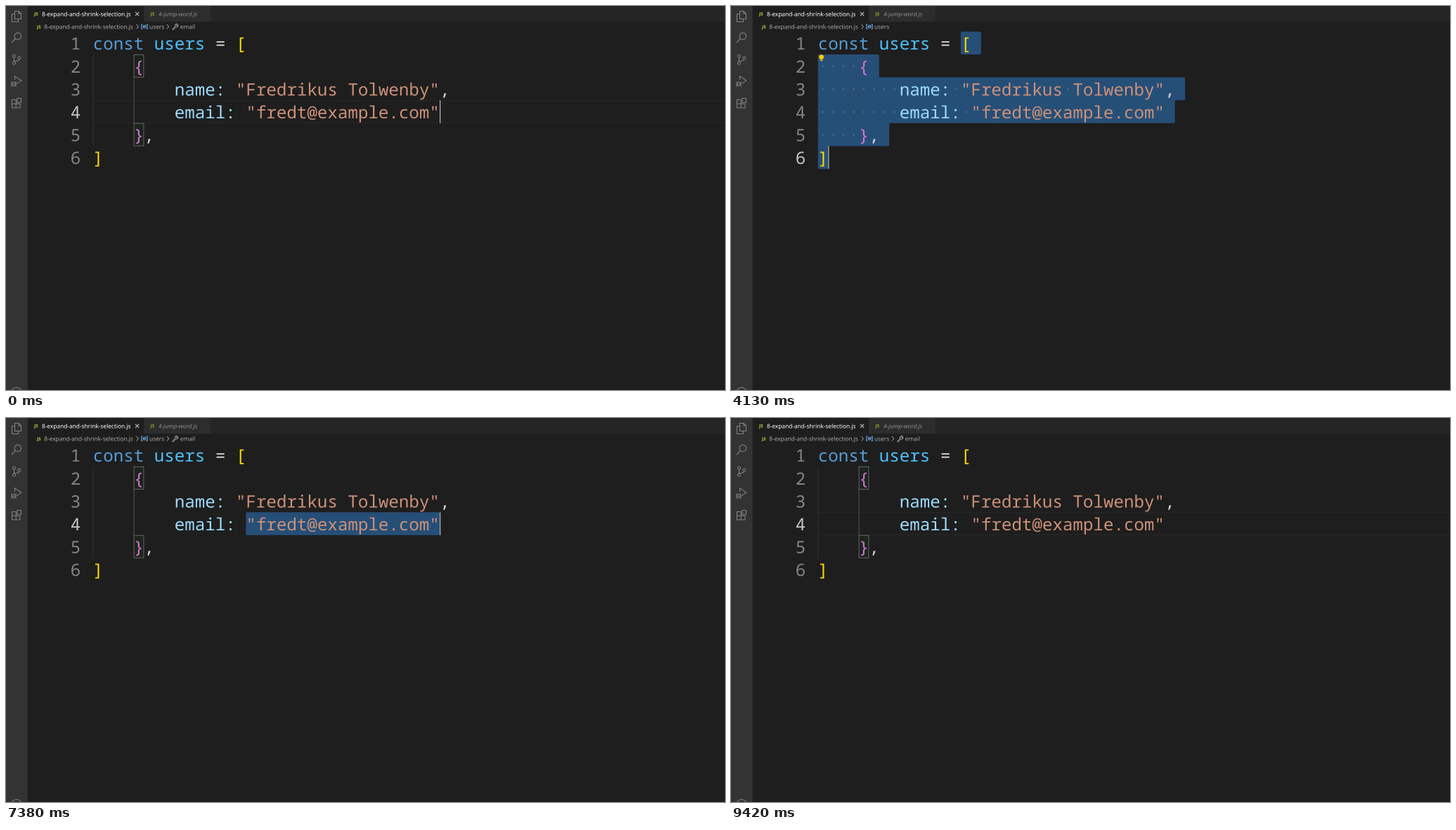
These frames come from a looping animation (1023 by 547 pixels, 9790 ms). An HTML page with a canvas:

```html
<!DOCTYPE html>
<html lang="en">
<head>
<meta charset="utf-8">
<title>Expand and shrink selection</title>
<style>
  html, body { margin: 0; width: 100%; height: 100%; overflow: hidden; background: #1e1e1e; }
  canvas { display: block; width: 100%; height: 100%; }
</style>
</head>
<body>
<canvas id="stage"></canvas>
<script>
const W = 1023, H = 547, LOOP = 9790;
const SHARP = 2;      // drawn at double size so text can sit between pixels
const UNIT = .6394;   // one interface pixel on the stage
const canvas = document.getElementById('stage');
canvas.width = W * SHARP;
canvas.height = H * SHARP;
const ctx = canvas.getContext('2d');

const CODE_FONT = '24.18px "Noto Sans Mono", "DejaVu Sans Mono", monospace';
const UI_FONT = '8.31px "Noto Sans", "Open Sans", sans-serif';
const BADGE_FONT = 'bold 6.3px "Noto Sans", sans-serif';
const BAR = 48 * UNIT, TABS = 35 * UNIT;
const LEFT = 123.7, PITCH = 14.51, TOP = 57 * UNIT, LINE = 51 * UNIT;

const BLUE = '#569cd6', CYAN = '#4fc1ff', PROP = '#9cdcfe', STR = '#ce9178';
const PLAIN = '#d4d4d4', GOLD = '#ffd700', PINK = '#da70d6', ICON = '#858585';

// Each line is a list of [column, text, colour].
const code = [
  [[0, 'const', BLUE], [6, 'users', CYAN], [12, '=', PLAIN], [14, '[', GOLD]],
  [[4, '{', PINK]],
  [[8, 'name:', PROP], [14, '"Fredrikus Tolwenby"', STR], [34, ',', PLAIN]],
  [[8, 'email:', PROP], [15, '"fredt@example.com"', STR]],
  [[4, '}', PINK], [5, ',', PLAIN]],
  [[0, ']', GOLD]]
];
const rows = code.map(parts =>
  parts.reduce((line, [col, text]) => line.padEnd(col) + text, ''));

// Selection levels: start line, start column, end line, end column.
const levels = [
  [3, 34, 3, 34], [3, 15, 3, 34], [3, 8, 3, 34], [3, 0, 3, 34],
  [1, 5, 4, 4], [1, 4, 4, 5], [1, 4, 4, 6], [1, 0, 4, 6],
  [0, 15, 5, 0], [0, 14, 5, 1], [0, 0, 5, 1]
];
const grow = [420, 920, 1330, 1670, 2080, 2420, 2750, 3080, 3380, 3670];
const shrink = [4130, 4460, 4750, 5080, 5460, 5710, 6000, 6330, 6630, 6920];

const xAt = col => LEFT + col * PITCH;
const yAt = line => TOP + line * LINE;
const within = (t, spans) => spans.some(([a, b]) => t >= a && t < b);

function levelAt(t) {
  if (t >= 8040) return Math.max(0, 9 - Math.floor((t - 8040) / 97.7));
  if (t >= 7380) return Math.min(10, 1 + Math.floor((t - 7380) / 45.5));
  const passed = list => list.filter(k => t >= k).length;
  return passed(grow) - passed(shrink);
}

function rect(x, y, w, h, color) {
  ctx.fillStyle = color;
  ctx.fillRect(x, y, w, h);
}

function label(text, x, y, color, font = UI_FONT) {
  ctx.font = font;
  ctx.fillStyle = color;
  ctx.fillText(text, x, y);
}

function stroke(d, color, width = 1) {
  ctx.strokeStyle = color;
  ctx.lineWidth = width;
  ctx.stroke(new Path2D(d));
}

function dot(x, y, r, color) {
  ctx.fillStyle = color;
  ctx.beginPath();
  ctx.arc(x, y, r, 0, Math.PI * 2);
  ctx.fill();
}

function ring(x, y, r, color = ICON, width = 1) {
  ctx.strokeStyle = color;
  ctx.lineWidth = width;
  ctx.beginPath();
  ctx.arc(x, y, r, 0, Math.PI * 2);
  ctx.stroke();
}

function drawActivityBar() {
  rect(0, 0, BAR, H, '#333333');
  // files
  stroke('M12.5 7.5H18L21.5 11V18.5H12.5ZM18 7.5V11H21.5', ICON);
  stroke('M12.5 11.5H8.5V22.5H17.5V18.5', ICON);
  // search
  ring(16.8, 43, 4.8);
  stroke('M13.3 46.5L8 52.2', ICON, 1.2);
  // source control
  ring(11.5, 71.3, 2);
  ring(18.8, 74.2, 2);
  ring(11.5, 81.2, 2);
  stroke('M11.5 73.3V79.2M18.8 76.2C18.5 79 14 77.5 11.8 79', ICON);
  // run and debug
  stroke('M12.5 105V99.8L21.8 106.3L15 111', ICON);
  ring(11, 111, 2.8);
  stroke('M7 108L8.8 109.4M15 108L13.2 109.4M6.8 111.2H15.2M7 115L8.8 113M15 115L13.2 113', ICON, .8);
  // extensions
  stroke('M8.5 133.5H14.2V145H8.5ZM8.5 139.2H20V145H14.2', ICON);
  stroke('M15.8 131.5H21.5V137.2H15.8Z', ICON);
  // account
  ring(15, 551, 7.5);
}

function drawHeader(emailCrumb) {
  const crumb = '#a9a9a9';
  const file = '8-expand-and-shrink-selection.js';
  const tabBase = 14.4, crumbBase = 32.65;
  rect(BAR, 0, W - BAR, TABS, '#252526');
  rect(BAR, 0, 196 - BAR, TABS, '#1e1e1e');
  rect(196.3, 0, 94, TABS, '#2d2d2d');
  label('JS', 40, 13.6, '#cbcb41', BADGE_FONT);
  label(file, 51, tabBase, '#ffffff');
  stroke('M184 8.7L189.2 13.9M189.2 8.7L184 13.9', '#e0e0e0', .9);
  label('JS', 205.5, 13.6, '#a5a53b', BADGE_FONT);
  label('4-jump-word.js', 217, tabBase, '#8d8d8d', 'italic ' + UI_FONT);

  label('JS', 44, 31.8, '#cbcb41', BADGE_FONT);
  label(file, 54.3, crumbBase, crumb);
  stroke('M185.5 26.2L188.5 29.4L185.5 32.6', crumb, .8);
  stroke('M194.6 26.2H192.8V32.6H194.6M199.4 26.2H201.2V32.6H199.4', '#75beff', .9);
  stroke('M195 28.6L197.4 27.4L199.2 28.4V30.2L196.8 31.4L195 30.4ZM195 28.6L197 29.5L199.2 28.4', '#75beff', .8);
  label('users', 204, crumbBase, crumb);
  if (!emailCrumb) return;
  stroke('M228.8 26.2L231.8 29.4L228.8 32.6', crumb, .8);
  stroke('M237 32.8L240.6 29.2C239.8 26.8 241.4 25 243.6 25.5L242 27.2L243.2 28.4L244.9 26.8C245.4 29 243.6 30.6 241.6 30.1L238.2 33.6C237.2 34.2 236.4 33.6 237 32.8Z', crumb, .8);
  label('email', 247.8, crumbBase, crumb);
}

function selectionSpans([l0, c0, l1, c1]) {
  const spans = [];
  for (let i = l0; i <= l1; i++) {
    spans[i] = [i === l0 ? c0 : 0, i === l1 ? c1 : rows[i].length + 1];
  }
  return spans;
}

function drawSelection(spans) {
  ctx.fillStyle = '#264f78';
  ctx.beginPath();
  spans.forEach(([a, b], i) => {
    if (a === b) return;
    // Round only the corners that no neighbouring row covers.
    const radius = (j, col) => {
      const n = spans[j];
      return n && n[0] <= col && n[1] >= col && n[0] !== n[1] ? 0 : 2;
    };
    ctx.roundRect(xAt(a), yAt(i), (b - a) * PITCH, LINE,
      [radius(i - 1, a), radius(i - 1, b), radius(i + 1, b), radius(i + 1, a)]);
  });
  ctx.fill();
}

function drawSpaces(spans) {
  spans.forEach(([a, b], i) => {
    for (let col = a; col < b; col++) {
      if (rows[i][col] === ' ') {
        dot(xAt(col + .5), yAt(i) + 16.7, 1.35, 'rgba(227,228,226,.17)');
      }
    }
  });
}

function drawBracketBox(line) {
  const x = xAt(4), y = yAt(line);
  rect(x, y, PITCH, LINE, 'rgba(0,100,0,.1)');
  ctx.strokeStyle = '#888888';
  ctx.lineWidth = UNIT;
  ctx.strokeRect(x + UNIT / 2, y + UNIT / 2, PITCH - UNIT, LINE - UNIT);
}

function drawCode(activeLine) {
  code.forEach((parts, i) => {
    const base = yAt(i) + 25.7;
    label(String(i + 1), 91.7, base, i === activeLine ? '#c6c6c6' : ICON, CODE_FONT);
    for (const [col, text, color] of parts) label(text, xAt(col), base, color, CODE_FONT);
  });
}

function drawBulb() {
  dot(128.6, 72.6, 3.4, '#ffcc00');
  rect(126.9, 75, 3.4, 3.2, '#ffcc00');
  rect(126.9, 76, 3.4, .6, '#5a4a10');
}

function draw(t) {
  const level = levelAt(t);
  const sel = levels[level];
  const [, , line, col] = sel;
  const spans = selectionSpans(sel);

  rect(0, 0, W, H, '#1e1e1e');
  drawHeader(!within(t, [[1830, 6160], [7960, 9080]]));
  drawActivityBar();

  if (level === 0) {
    const border = 2 * UNIT;
    rect(LEFT, yAt(line), W, border, '#282828');
    rect(LEFT, yAt(line + 1) - border, W, border, '#282828');
  }
  drawSelection(spans);
  rect(xAt(0), yAt(1), UNIT, 4 * LINE, '#404040');
  rect(xAt(4), yAt(2), UNIT, 2 * LINE, line < 5 ? '#707070' : '#404040');
  if (within(t, [[0, 460], [6960, 7420], [8960, LOOP]])) {
    drawBracketBox(1);
    drawBracketBox(4);
  }
  drawSpaces(spans);
  drawCode(line);
  if (t < 9420) rect(xAt(col), yAt(line), 2 * UNIT, LINE, '#aeafad');
  if (within(t, [[670, 920], [1920, 3670], [4130, 6250], [6920, 7170], [8040, 9170]])) drawBulb();
}

ctx.scale(SHARP, SHARP);
ctx.textBaseline = 'alphabetic';
ctx.textRendering = 'geometricPrecision';
const start = performance.now();
function tick() {
  draw((performance.now() - start) % LOOP);
  requestAnimationFrame(tick);
}
tick();
</script>
</body>
</html>
```
